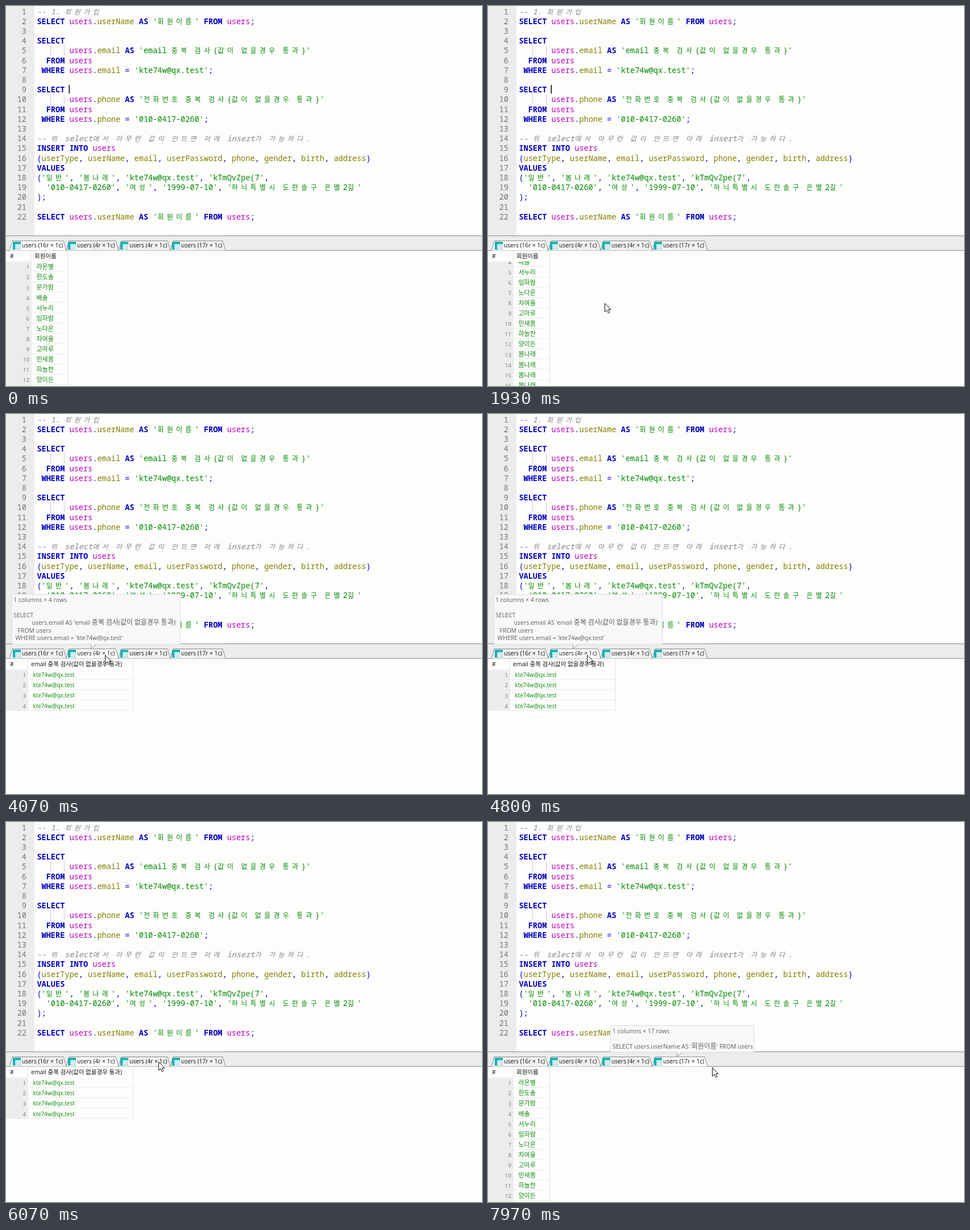
An HTML page for the animation above (8 s loop, 837 by 669 pixels).

```html
<!DOCTYPE html>
<html lang="ko">
<head>
<meta charset="utf-8">
<title>SQL results</title>
<style>
  html, body { margin: 0; width: 100%; height: 100%; overflow: hidden; background: #fdfdfc; }
  svg { display: block; }
  text { white-space: pre; font: 10.5px "Open Sans", "Noto Sans CJK KR", sans-serif; }
  .code { font: 13.58px "Noto Sans Mono", "Noto Sans CJK KR", monospace; }
  .hangul { font: 12px "Noto Sans CJK KR", sans-serif; }
  .keyword { fill: #0000c4; font-weight: bold; }
  .table { fill: #b800bc; }
  .column { fill: #808000; }
  .string { fill: #008a00; }
  .comment { fill: #858585; font-style: italic; }
  .mark { fill: #0000c0; }
  .lineNo { fill: #757575; }
  .tab { font-size: 10.2px; fill: #111; }
  .name { font-size: 11px; fill: #0a8a0a; }
  .value { font-size: 9.9px; fill: #0a8a0a; }
  .rowNo { font-size: 9.8px; fill: #777; }
  .tip { fill: #5c5c5c; }
</style>
</head>
<body>
<script>
const LOOP = 8000, CELL = 8.153, LINE = 17.2, ROW = 18.1;
const GREY = '#ececee', PAPER = '#fdfdfc';
const EMAIL = 'kte74w@qx.test', PHONE = '010-0417-0260', MEMBER = '봄나래';
const NAMES = ['라온별', '한도솔', '문가람', '배솔', '서누리', '임하람', '노다온', '차여울',
  '고마루', '민새봄', '하늘찬', '양이든'];
const CHECK = '중복 검사(값이 없을경우 통과)';

const CODE = `-- 1. 회원가입
SELECT users.userName AS '회원이름' FROM users;

SELECT
       users.email AS 'email ${CHECK}'
  FROM users
 WHERE users.email = '${EMAIL}';

SELECT
       users.phone AS '전화번호 ${CHECK}'
  FROM users
 WHERE users.phone = '${PHONE}';

-- 위 select에서 아무런 값이 안뜨면 아래 insert가 가능하다.
INSERT INTO users
(userType, userName, email, userPassword, phone, gender, birth, address)
VALUES
('일반', '${MEMBER}', '${EMAIL}', 'kTmQvZpe(7',
  '${PHONE}', '여성', '1999-07-10', '하늬특별시 도란솔구 은별2길'
);

SELECT users.userName AS '회원이름' FROM users;`.split('\n');

function add(parent, tag, attrs = {}, content) {
  const el = document.createElementNS('http://www.w3.org/2000/svg', tag);
  for (const key in attrs) el.setAttribute(key, attrs[key]);
  if (content !== undefined) el.textContent = content;
  parent.append(el);
  return el;
}
const rect = (g, x, y, width, height, fill, more) => add(g, 'rect', { x, y, width, height, fill, ...more });
const label = (g, x, y, content, cls, more) => add(g, 'text', { x, y, class: cls, ...more }, content);
const line = (g, d, stroke, more) => add(g, 'path', { d, stroke, fill: 'none', ...more });
const show = (el, on) => { el.style.display = on ? '' : 'none'; };

const svg = add(document.body, 'svg', { width: 837, height: 669, viewBox: '0 0 837 669' });

// Editor
function kindOf(token) {
  if (token.startsWith('--')) return 'comment';
  if (token[0] === "'") return 'string';
  if (/^[A-Z]+$/.test(token)) return 'keyword';
  if (token === 'users') return 'table';
  return /^\w/.test(token) ? 'column' : 'mark';
}

// Hangul takes two cells of the character grid, everything else one.
function drawCode(source, y) {
  let col = 0;
  for (const token of source.match(/--.*|'[^']*'|\w+|\s+|[^\w\s']/g) || []) {
    for (const part of token.match(/[가-힣]|[^가-힣]+/g)) {
      const wide = /[가-힣]/.test(part);
      if (part.trim()) {
        label(svg, 54.4 + col * CELL, y, part, `${wide ? 'hangul' : 'code'} ${kindOf(token)}`);
      }
      col += wide ? 2 : part.length;
    }
  }
}

rect(svg, 0, 0, 837, 669, PAPER);
rect(svg, 0, 0, 50, 405, GREY);
CODE.forEach((source, i) => {
  const y = Math.round(14.6 + i * LINE);
  label(svg, 36, y, i + 1, 'code lineNo', { 'text-anchor': 'end' });
  drawCode(source, y);
});
for (const y of [70, 156]) {
  line(svg, `M78.5 ${y}v17M102.5 ${y}v17`, '#999', { 'stroke-dasharray': '1 1' });
}
const caret = rect(svg, 110.5, 139, 1.5, 15, '#000');

// Result tabs
rect(svg, 0, 405, 837, 26, GREY);
line(svg, 'M0 404.5H837M0 430.5H837', '#8a8a8a');
const TABS = [[6, 106, 28, 16], [106, 198, 125, 4], [198, 289, 217, 4], [289, 386, 308, 17]];
const tabs = TABS.map(([left, right, textX, rows]) => {
  const shape = line(svg, `M${left} 430.5L${left + 5} 413.5H${right - 5}L${right} 430.5`, '#8a8a8a');
  const x = textX - 16;
  rect(svg, x, 415, 14, 14, '#b4dfe2');
  line(svg, `M${x + 4} 422.5h10M${x + 4} 425.5h10M${x + 7.5} 419v10M${x + 10.5} 419v10`, '#e8f6f6');
  rect(svg, x, 415, 14, 4, '#12b0b4');
  rect(svg, x, 415, 4, 14, '#12b0b4');
  label(svg, textX, 425.3, `users (${rows}r × 1c)`, 'tab');
  return shape;
});

// Result grids
const clip = add(add(svg, 'defs'), 'clipPath', { id: 'rows' });
rect(clip, 0, 450, 837, 219);

function makeGrid(title, values, { gutter, titleX, textX, right, cls }) {
  const grid = add(svg, 'g');
  label(grid, 7, 444, '#', 'tab');
  label(grid, titleX, 443.7, title, '', { fill: '#111' });
  line(grid, `M${gutter - .5} 431v19M${right + .5} 431v19`, '#e6e6ea');
  const body = add(add(grid, 'g', { 'clip-path': 'url(#rows)' }), 'g');
  rect(body, 0, 450, gutter, values.length * ROW, GREY);
  line(body, `M${right + .5} 450v${values.length * ROW}`, '#e2e2e8');
  values.forEach((value, i) => {
    const y = 450 + i * ROW;
    label(body, gutter - 4, y + 13.3, i + 1, 'rowNo', { 'text-anchor': 'end' });
    label(body, textX, y + 13.2, value, cls);
    line(body, `M${gutter} ${Math.round(y + ROW) - .5}H${right}`, '#e4e4e8', { 'stroke-dasharray': '2 1' });
  });
  return { grid, body };
}

const nameLayout = { gutter: 45, titleX: 50, textX: 53.5, right: 108, cls: 'name' };
const checkLayout = right => ({ gutter: 39, titleX: 44, textX: 47.5, right, cls: 'value' });
const members = count => [...NAMES, ...Array(count - NAMES.length).fill(MEMBER)];
const grids = [
  makeGrid('회원이름', members(16), nameLayout),
  makeGrid(`email ${CHECK}`, Array(4).fill(EMAIL), checkLayout(223)),
  makeGrid(`전화번호 ${CHECK}`, Array(4).fill(PHONE), checkLayout(241)),
  makeGrid('회원이름', members(17), nameLayout),
];

// Tooltips
function makeTip(x, y, width, tipX, rows) {
  const tip = add(svg, 'g');
  const bottom = 405.5;
  add(tip, 'path', {
    d: `M${x} ${y}H${x + width}V${bottom}H${tipX + 9}L${tipX} 413L${tipX} ${bottom}H${x}Z`,
    fill: '#f8f8f9', stroke: '#dcdce0', 'stroke-linejoin': 'round',
  });
  line(tip, `M${tipX} ${bottom}V413L${tipX + 9} ${bottom}`, '#999');
  for (const [dx, row, content] of rows) {
    const text = label(tip, x + dx, y + 13.4 + row * 13.5, '', 'tip');
    for (const part of content.match(/[가-힣]+|[^가-힣]+/g)) {
      add(text, 'tspan', /[가-힣]/.test(part) ? { class: 'hangul' } : {}, part);
    }
  }
  return tip;
}
const tips = [
  [3950, 5150, makeTip(10.5, 317.5, 296, 149.5, [
    [2.5, 0, '1 columns × 4 rows'],
    [2.5, 2, 'SELECT'],
    [35, 3, `users.email AS 'email ${CHECK}'`],
    [10, 4, 'FROM users'],
    [6, 5, `WHERE users.email = '${EMAIL}'`],
  ])],
  [6900, LOOP, makeTip(215.5, 358.5, 252, 332.5, [
    [3.5, 0, '1 columns × 17 rows'],
    [3.5, 2, "SELECT users.userName AS '회원이름' FROM users"],
  ])],
];

const pointer = add(svg, 'path', {
  d: 'M.5 .5V15.5L4 12.2L6.4 17.6L8.9 16.5L6.5 11.3H11Z', fill: '#fff', stroke: '#111',
});

// Timeline: [ms, ...values]
const POINTER = [[0, 840, 665], [150, 840, 665], [800, 205, 523], [2700, 205, 523], [3300, 189, 434],
  [3430, 189, 434], [3620, 174, 424], [5080, 174, 424], [5500, 275, 433], [5850, 275, 433],
  [6000, 268, 422], [6350, 268, 422], [6700, 375, 419], [7500, 375, 419], [7850, 394, 432], [LOOP, 394, 432]];
const ACTIVE = [[0, 0], [3700, 1], [6130, 2], [7350, 3]];
const SCROLL = [[0, 0], [1000, 54], [1120, 63]];

const stepAt = (steps, t) => steps.findLast(([at]) => at <= t)[1];

function pointerAt(t) {
  const i = POINTER.findIndex(([at]) => at > t);
  const [t0, x0, y0] = POINTER[i - 1], [t1, x1, y1] = POINTER[i];
  const p = (t - t0) / (t1 - t0), k = p * p * (3 - 2 * p);
  return [x0 + (x1 - x0) * k, y0 + (y1 - y0) * k].map(Math.round);
}

function render(t) {
  const active = stepAt(ACTIVE, t);
  tabs.forEach((tab, i) => tab.setAttribute('fill', i === active ? '#fff' : '#f1f1f2'));
  grids.forEach(({ grid }, i) => show(grid, i === active));
  grids[0].body.setAttribute('transform', `translate(0 ${-stepAt(SCROLL, t)})`);
  for (const [from, to, tip] of tips) show(tip, t >= from && t < to);
  show(caret, (t + 240) % 1080 < 540);
  pointer.setAttribute('transform', `translate(${pointerAt(t)})`);
}

const start = performance.now();
function frame() {
  render((performance.now() - start) % LOOP);
  requestAnimationFrame(frame);
}
frame();
</script>
</body>
</html>
```
